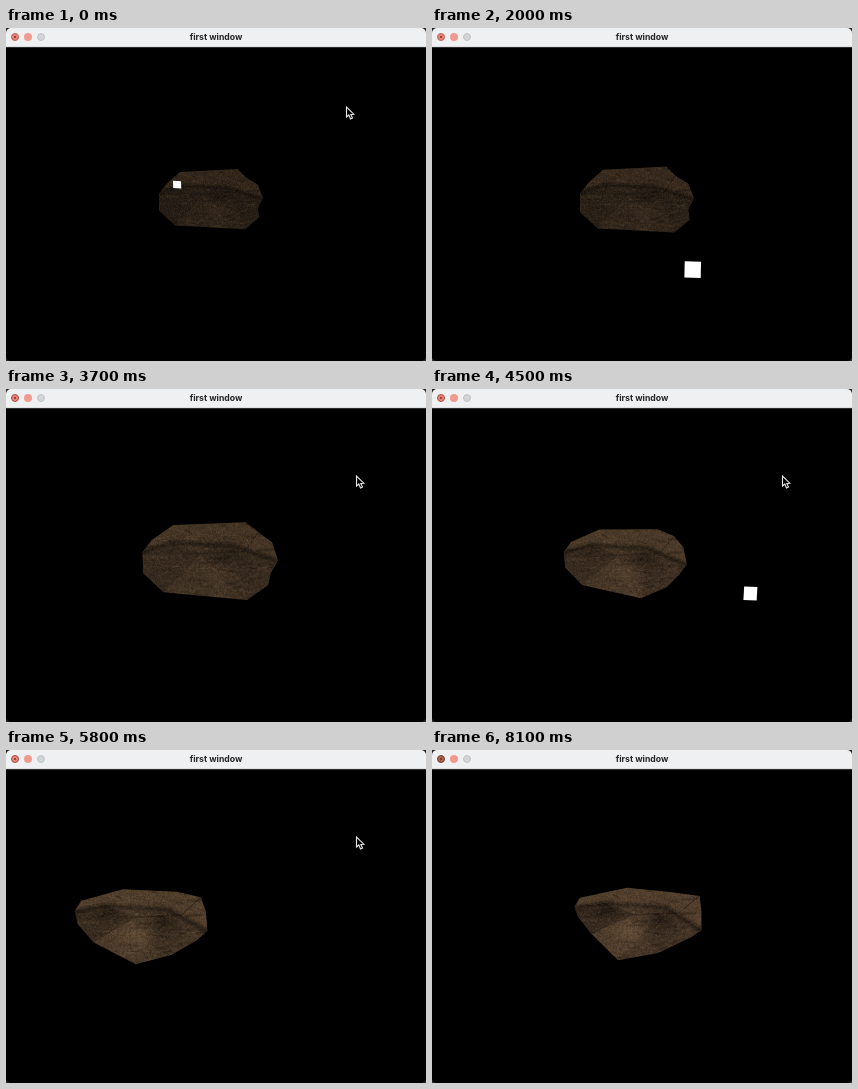
An HTML page with a canvas that plays this animation: 420 px wide and 333 px high, repeating every 8.2 s.

```html
<!DOCTYPE html>
<html lang="en">
<head>
<meta charset="utf-8">
<title>first window</title>
<style>
html, body { margin: 0; width: 100%; height: 100%; overflow: hidden; background: #292929; }
.window { position: relative; width: 420px; height: 333px; border-radius: 5px; overflow: hidden; background: #000; }
.bar {
  position: absolute; inset: 0 0 auto; height: 18px; background: #eff0f1;
  border-bottom: 1px solid #dfe0e1; box-shadow: 0 1px #2c2e2f;
  font: 700 8.7px/18px Inter, "Open Sans", sans-serif; color: #262626; text-align: center;
}
.bar i { position: absolute; top: 5px; width: 8px; height: 8px; border-radius: 50%; box-sizing: border-box; }
.close { left: 5px; background: #ed8177; border: 1px solid #b9645a; animation: close 8.2s step-end infinite; }
.mini { left: 18px; background: #f19a90; animation: mini 8.2s step-end infinite; }
.zoom { left: 31px; background: #d3d4d5; border: 1px solid #c3c4c5; }
.close::after { content: ""; position: absolute; left: 2px; top: 2px; width: 2px; height: 2px; border-radius: 50%; background: #6c332d; }
canvas { position: absolute; inset: 0; }
@keyframes close {
  34.1% { background: #95613f; border-color: #704832; }
  45.1% { background: #ed8177; border-color: #a94f46; }
  78% { background: #ad6246; border-color: #704235; }
}
@keyframes mini {
  34.1% { background: #dfae61; }
  45.1% { background: #f19a90; }
}
</style>
</head>
<body>
<div class="window">
  <canvas id="view" width="420" height="333"></canvas>
  <div class="bar"><i class="close"></i><i class="mini"></i><i class="zoom"></i>first window</div>
</div>
<script>
const LOOP = 8200, STEP = 100, WIDTH = 140;
const g = document.getElementById('view').getContext('2d');

// The rock before and after its turn: twelve outline points, then two on the ridge.
const front = [[-70, 15], [-70, -8], [-60, -21], [-42, -37], [36, -41], [47, -30], [63, -20],
  [70, -2], [63, 12], [65, 24], [46, 40], [-48, 35], [-42, -19], [21, -16]];
const turned = [[-65, -8], [-69, -19], [-63, -29], [-11, -40], [39, -35], [69, -31], [71, -15],
  [71, 7], [59, 15], [23, 32], [-21, 40], [-50, 11], [-36, -23], [33, -18]];

// time, centre x, centre y, width, brightness
const poses = [
  [0, 205, 171.5, 104, 43], [2000, 205, 172, 114, 48], [3200, 204, 171.5, 140, 60],
  [4500, 193, 174, 123, 71], [5200, 124, 176.5, 132, 76], [6600, 167, 175.5, 131, 78],
  [8100, 205, 174, 127, 78]
];
// time, angle of the lamp on its orbit in degrees
const orbit = [[0, -90], [2000, 90], [3200, 247], [4500, 365], [5200, 450]];

const clamp = v => Math.min(1, Math.max(0, v));
const mix = (a, b, u) => a + (b - a) * u;

function slope(keys, n, c) {
  const a = keys[Math.max(n - 1, 0)], b = keys[Math.min(n + 1, keys.length - 1)];
  return (b[c] - a[c]) / (b[0] - a[0]);
}

function sample(keys, t) {
  t = Math.min(t, keys.at(-1)[0]);
  let n = 0;
  while (n < keys.length - 2 && t >= keys[n + 1][0]) n++;
  const a = keys[n], b = keys[n + 1], d = b[0] - a[0], u = (t - a[0]) / d;
  return a.slice(1).map((v, i) => mix(v, b[i + 1], u * u * (3 - 2 * u)) + d * u * (1 - u) *
    ((1 - u) * slope(keys, n, i + 1) - u * slope(keys, n + 1, i + 1)));
}

function makeGrain(w, h) {
  const tile = document.createElement('canvas');
  tile.width = w;
  tile.height = h;
  const c = tile.getContext('2d');
  let seed = 71;
  const rnd = () => (seed = seed * 16807 % 2147483647) / 2147483647;
  for (let i = 0; i < 170; i++) {
    const x = rnd() * w, y = rnd() * h, len = 4 + rnd() * 14;
    c.strokeStyle = rnd() < .6 ? `rgba(0,0,0,${rnd() * .26})` : `rgba(180,140,100,${rnd() * .1})`;
    c.lineWidth = 1 + rnd() * 2;
    c.beginPath();
    c.moveTo(x, y);
    c.quadraticCurveTo(x + len / 2, y - 3 + rnd() * 3, x + len, y + rnd() * 8 - 4);
    c.stroke();
  }
  for (let y = 0; y < h; y++) for (let x = 0; x < w; x++) {
    const v = rnd();
    c.fillStyle = v < .55 ? `rgba(0,0,0,${v * .42})` : `rgba(190,150,110,${(v - .55) * .28})`;
    c.fillRect(x, y, 1, 1);
  }
  return tile;
}
const grain = makeGrain(WIDTH, 82);

function trace(pts, close = true) {
  g.beginPath();
  pts.forEach(([x, y]) => g.lineTo(x, y));
  if (close) g.closePath();
}

function fill(pts, color) {
  trace(pts);
  g.fillStyle = color;
  g.fill();
}

function stroke(pts, width, color) {
  trace(pts, false);
  g.lineWidth = width;
  g.strokeStyle = color;
  g.stroke();
}

function glow(x, y, r, rgb, alpha, flat = 1) {
  const f = g.createRadialGradient(0, 0, 0, 0, 0, r);
  [1, .55, .22, .06, 0].forEach((a, i) => f.addColorStop(i / 4, `rgba(${rgb},${alpha * a})`));
  g.save();
  g.translate(x, y);
  g.scale(1, flat);
  g.fillStyle = f;
  g.fillRect(-r, -r, r * 2, r * 2);
  g.restore();
}

function drawRock(t) {
  const [cx, cy, w, tone] = sample(poses, t);
  const turn = 1 - (1 - clamp((t - 3400) / 4700)) ** 2;
  const p = front.map(([x, y], i) => [mix(x, turned[i][0], turn), mix(y, turned[i][1], turn)]);
  const edge = p.slice(0, 12), [r1, r2] = p.slice(12);
  const mid = [(r1[0] + r2[0]) / 2, (r1[1] + r2[1]) / 2 + 10];

  g.save();
  g.translate(cx, cy);
  g.scale(w / WIDTH, w / WIDTH);
  g.lineJoin = g.lineCap = 'round';
  fill(edge, `rgb(${[1, .77, .56].map(k => Math.round(tone * k))})`);
  g.clip();
  fill([...p.slice(1, 8), r2, r1], 'rgba(180,130,75,.05)');
  fill([p[0], p[1], r1, mid, p[11]], `rgba(0,0,0,${.14 + turn * .14})`);
  fill([r2, p[7], p[8], p[9], p[10]], 'rgba(0,0,0,.12)');
  glow(r2[0] - 8, r2[1] + 13, 42, '0,0,0', .5, .7);
  glow(r1[0] + 4, r1[1] + 9, 34, '0,0,0', turn * .5, .5);
  for (const k of [7, 4, 1.2]) stroke([p[1], r1, r2, p[7]], k, 'rgba(0,0,0,.16)');
  stroke([p[5], [r2[0] + 13, r2[1] + 6], mid], 1.3, 'rgba(0,0,0,.3)');
  stroke([r1, [r1[0] + 14, r1[1] + 12], mid, p[10]], 1.5, 'rgba(0,0,0,.13)');
  glow(mix(mid[0], p[10][0], .4), mid[1] + 20, 38, '165,128,92', .12 + turn * .18);
  glow(-55, -10, 46, '255,220,172', 1.1 * Math.exp(-(((t - 3200) / 250) ** 2)));
  g.drawImage(grain, -WIDTH / 2, -41);
  g.restore();
}

function lampAt(t) {
  const angle = sample(orbit, t)[0] * Math.PI / 180;
  const near = Math.sin(angle), side = Math.cos(angle - .436);
  const zoom = sample(poses, t)[2] / WIDTH;
  const leave = Math.max(0, t - 4500) / 700;
  return {
    x: 205 + zoom * 135 * side * (1 + .2 * near) + 120 * leave,
    y: 171.5 + zoom * (33 + 53 * near) + 160 * leave ** 2,
    size: zoom * (15.5 + 5 * near),
    behind: near < -.3 && side > -.45 + .04 * zoom
  };
}

function drawLamp({ x, y, size }) {
  const a = size / 2, tilt = (x - 205) / 150;
  fill([[x - a + tilt, y - a], [x + a, y - a + .5], [x + a - tilt, y + a], [x - a, y + a - .5]], '#fff');
}

function drawCursor(t) {
  const early = t < 1000;
  if (!early && (t < 2800 || t >= 7300)) return;
  g.save();
  g.translate(early ? 340.5 : 350.5, early ? 79 : 87);
  trace([[0, 0], [0, 10], [2.3, 8], [4, 12], [6, 11], [4.3, 7.4], [7.3, 7.2]]);
  g.fillStyle = '#000';
  g.fill();
  g.lineWidth = 1.1;
  g.strokeStyle = '#e8e8e8';
  g.stroke();
  g.restore();
}

function draw(t) {
  const lamp = lampAt(t);
  g.fillStyle = '#000';
  g.fillRect(0, 0, 420, 333);
  if (lamp.behind) drawLamp(lamp);
  drawRock(t);
  if (!lamp.behind && t < 5200) drawLamp(lamp);
  drawCursor(t);
}

function tick() {
  draw(Math.floor(performance.now() % LOOP / STEP) * STEP);
  requestAnimationFrame(tick);
}
tick();
</script>
</body>
</html>
```
